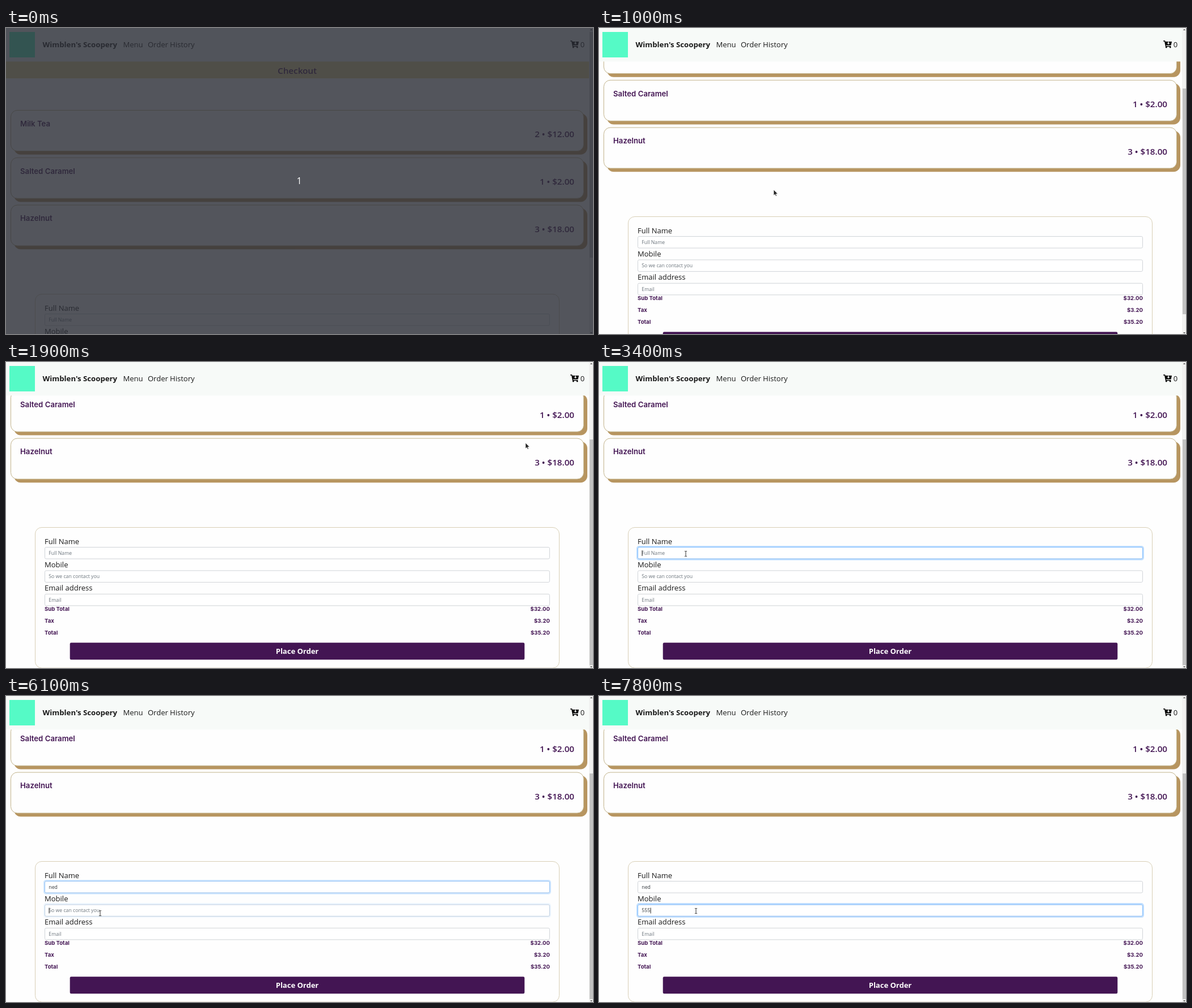
An HTML page for the animation above (8000 ms loop, 1035 by 541 pixels).

```html
<!DOCTYPE html>
<html lang="en">
<head>
<meta charset="utf-8">
<title>Checkout</title>
<style>
@property --scroll { syntax: "<number>"; inherits: true; initial-value: 0; }

html, body { margin: 0; width: 100%; height: 100%; overflow: hidden; background: #fefefe; }
svg {
  --scroll: 0;
  display: block; width: 1035px; height: 541px;
  font: 13px "Open Sans", "Noto Sans", sans-serif;
  animation: scroll 8s step-end infinite;
}
text { fill: #191919; white-space: pre; }
.end { text-anchor: end; }
.mid { text-anchor: middle; }

.page { transform: translateY(calc(var(--scroll) * -1px)); }
.thumb { fill: #c1c1c1; transform: translateY(calc(var(--scroll) * .73px)); }

.brand { font-size: 13.2px; font-weight: 700; }
.heading { font-size: 15.2px; font-weight: 600; fill: #431553; }
.item { font: 600 13.2px Inter, sans-serif; fill: #431553; }
.sum { font: 700 9.6px Inter, sans-serif; fill: #431553; }
.order { font-weight: 700; fill: #fff; }
.hint { font-size: 8.7px; fill: #6c757d; }
.value { font-size: 8.7px; fill: #33383d; }
.count { font-size: 16px; fill: #fff; }

.card { fill: #fefefe; stroke: #c2b48c; }
.shade { fill: #b79560; }
.form { fill: #fefefe; stroke: #d8cfb6; }
.field { fill: #fff; stroke: #d0d4d8; }
.glow { fill: none; stroke: #bfdeff; stroke-width: 2; }
.edge { fill: none; stroke: #80bdff; }
.caret { fill: #222; }

.intro, .ring, .caret, .hint, .value tspan, .arrow, .beam {
  animation: 8s step-end infinite;
}
.intro { animation-name: intro; }
.pointer { animation: move 8s infinite; }
.arrow { animation-name: arrow; }
.beam { animation-name: beam; }
.ring1 { animation-name: ring1; }
.ring2 { animation-name: ring2; }
.caret1 { animation-name: caret1; }
.caret2 { animation-name: caret2; }
.hint1 { animation-name: hint1; }
.hint2 { animation-name: hint2; }
.value .a1 { animation-name: a1; }
.value .a2 { animation-name: a2; }
.value .a3 { animation-name: a3; }
.value .b1 { animation-name: b1; }
.value .b2 { animation-name: b2; }
.value .b3 { animation-name: b3; }

/* 1.25% is 100 ms */
@keyframes intro { 0% { visibility: visible } 1.25%, 100% { visibility: hidden } }
@keyframes scroll {
  0% { --scroll: 0 }
  7.5% { --scroll: .8 }
  8.75% { --scroll: 8.8 }
  10% { --scroll: 33 }
  11.25% { --scroll: 82 }
  12.5% { --scroll: 137 }
  13.75% { --scroll: 166 }
  15% { --scroll: 176.5 }
  16.25%, 100% { --scroll: 178 }
}
@keyframes move {
  0% { transform: translate(308px, 286px) }
  16.25% { transform: translate(308px, 286px); animation-timing-function: steps(6) }
  23.75% { transform: translate(916px, 143px); animation-timing-function: steps(3) }
  27.5% { transform: translate(948px, 165px); animation-timing-function: steps(4) }
  32.5% { transform: translate(260px, 408px); animation-timing-function: steps(3) }
  36.25% { transform: translate(153px, 339px) }
  67.5% { transform: translate(153px, 339px); animation-timing-function: steps(4) }
  72.5% { transform: translate(150px, 413px); animation-timing-function: steps(3) }
  76.25% { transform: translate(166px, 384px); animation-timing-function: steps(1) }
  77.5%, 100% { transform: translate(171px, 380px) }
}
@keyframes arrow {
  0% { visibility: hidden }
  3.75% { visibility: visible }
  32.5%, 100% { visibility: hidden }
}
@keyframes beam { 0% { visibility: hidden } 32.5%, 100% { visibility: visible } }
@keyframes ring1 {
  0% { opacity: 0 }
  41.25% { opacity: .6 }
  42.5% { opacity: 1 }
  76.25% { opacity: .75 }
  77.5%, 100% { opacity: 0 }
}
@keyframes ring2 {
  0% { opacity: 0 }
  76.25% { opacity: .25 }
  77.5% { opacity: .95 }
  78.75%, 100% { opacity: 1 }
}
@keyframes caret1 {
  0% { visibility: hidden; transform: none }
  41.25% { visibility: visible; transform: none }
  48.75% { visibility: hidden; transform: none }
  52.5% { visibility: visible; transform: translateX(5.4px) }
  55% { visibility: visible; transform: translateX(10.3px) }
  57.5% { visibility: visible; transform: translateX(15.6px) }
  76.25%, 100% { visibility: hidden; transform: none }
}
@keyframes caret2 {
  0% { visibility: hidden; transform: none }
  76.25% { visibility: visible; transform: none }
  85% { visibility: hidden; transform: none }
  87.5% { visibility: visible; transform: translateX(5px) }
  92.5% { visibility: visible; transform: translateX(10px) }
  95%, 100% { visibility: visible; transform: translateX(15px) }
}
@keyframes hint1 { 0% { visibility: visible } 52.5%, 100% { visibility: hidden } }
@keyframes hint2 { 0% { visibility: visible } 87.5%, 100% { visibility: hidden } }
@keyframes a1 { 0% { visibility: hidden } 52.5%, 100% { visibility: visible } }
@keyframes a2 { 0% { visibility: hidden } 55%, 100% { visibility: visible } }
@keyframes a3 { 0% { visibility: hidden } 57.5%, 100% { visibility: visible } }
@keyframes b1 { 0% { visibility: hidden } 87.5%, 100% { visibility: visible } }
@keyframes b2 { 0% { visibility: hidden } 92.5%, 100% { visibility: visible } }
@keyframes b3 { 0% { visibility: hidden } 95%, 100% { visibility: visible } }
</style>
</head>
<body>
<svg viewBox="0 0 1035 541">
  <defs>
    <g id="card">
      <rect class="shade" x="14" y="151" width="1011" height="72.8" rx="12"/>
      <rect class="card" x="8.5" y="145.5" width="1010" height="72" rx="11.5"/>
    </g>
    <rect id="field" class="field" x="68.5" y="505.5" width="890" height="20.5" rx="2.3"/>
    <g id="ring">
      <rect class="glow" x="67" y="504" width="893" height="23.5" rx="3.5"/>
      <rect class="edge" x="68.5" y="505.5" width="890" height="20.5" rx="2.3"/>
    </g>
  </defs>

  <rect width="1035" height="541" fill="#fefefe"/>

  <g class="page">
    <rect y="59" width="1028" height="30" fill="#e8d794"/>
    <text class="heading mid" x="513.5" y="80.5">Checkout</text>

    <g>
      <use href="#card"/>
      <text class="item" x="25" y="173.8">Milk Tea</text>
      <text class="heading end" x="1002" y="193">2 • $12.00</text>
    </g>
    <g transform="translate(0 83.75)">
      <use href="#card"/>
      <text class="item" x="25" y="173.8">Salted Caramel</text>
      <text class="heading end" x="1002" y="193">1 • $2.00</text>
    </g>
    <g transform="translate(0 167.5)">
      <use href="#card"/>
      <text class="item" x="25" y="173.8">Hazelnut</text>
      <text class="heading end" x="1002" y="193">3 • $18.00</text>
    </g>

    <rect class="form" x="51.5" y="470.5" width="924" height="248.5" rx="11.5"/>

    <g>
      <text x="68" y="499.5">Full Name</text>
      <use href="#field"/>
      <use href="#ring" class="ring ring1"/>
      <text class="hint hint1" x="75.3" y="519">Full Name</text>
      <text class="value" x="75.3" y="519"><tspan class="a1">n</tspan><tspan class="a2">e</tspan><tspan class="a3">d</tspan></text>
      <rect class="caret caret1" x="75.6" y="511" width="1" height="10"/>
    </g>
    <g transform="translate(0 41.4)">
      <text x="68" y="499.5">Mobile</text>
      <use href="#field"/>
      <use href="#ring" class="ring ring2"/>
      <text class="hint hint2" x="75.3" y="519">So we can contact you</text>
      <text class="value" x="75.3" y="519"><tspan class="b1">5</tspan><tspan class="b2">5</tspan><tspan class="b3">5</tspan></text>
      <rect class="caret caret2" x="75.6" y="511" width="1" height="10"/>
    </g>
    <g transform="translate(0 82.8)">
      <text x="68" y="499.5">Email address</text>
      <use href="#field"/>
      <text class="hint" x="75.3" y="519">Email</text>
    </g>

    <text class="sum" x="68" y="618">Sub Total</text>
    <text class="sum end" x="959" y="618">$32.00</text>
    <text class="sum" x="68" y="638.8">Tax</text>
    <text class="sum end" x="959" y="638.8">$3.20</text>
    <text class="sum" x="68" y="659.5">Total</text>
    <text class="sum end" x="959" y="659.5">$35.20</text>

    <rect x="112.7" y="674.3" width="801.6" height="30" rx="2.3" fill="#431553"/>
    <text class="order mid" x="513.5" y="693.7">Place Order</text>
  </g>

  <g>
    <rect width="1028" height="59.3" fill="#f7faf8"/>
    <rect x="6" y="7" width="45" height="45" fill="#55fac6"/>
    <text class="brand" x="64.5" y="33.5">Wimblen's Scoopery</text>
    <text x="206.5" y="33.5">Menu</text>
    <text x="250" y="33.5">Order History</text>
    <path d="M995 22.2h3.2l.4 1.7h11.4l-1.4 6.5h-8.7l.3 1.4h8v1.4h-9.2l-2-9.5h-2z"/>
    <circle cx="1000.2" cy="34.1" r="1.4"/>
    <circle cx="1007.2" cy="34.1" r="1.4"/>
    <path d="M1003.2 24.4h1.6v2h1.8l-2.6 2.7-2.6-2.7h1.8z" fill="#f7faf8"/>
    <text x="1012.8" y="33.5">0</text>
  </g>

  <g>
    <rect x="1028" width="7" height="541" fill="#f1f1f0"/>
    <rect class="thumb" x="1029" y="7" width="6" height="399"/>
    <path d="M1030 4l2-2.2 2 2.2zM1030 538l2 2.2 2-2.2z" fill="#505050"/>
  </g>

  <g class="pointer">
    <path class="arrow" d="M0 0v10l2.3-2.1 1.5 3.3 1.6-.7-1.5-3.2h3.2z" fill="#222" stroke="#fff" stroke-width=".6"/>
    <path class="beam" d="M-2-4.5h1.5l.5.5.5-.5h1.5M0-4v8M-2 4.5h1.5l.5-.5.5.5h1.5" fill="none" stroke="#333"/>
  </g>

  <g class="intro">
    <rect width="1035" height="541" fill="#2c2e37" fill-opacity=".81"/>
    <text class="count mid" x="517" y="276">1</text>
  </g>
</svg>
</body>
</html>
```
